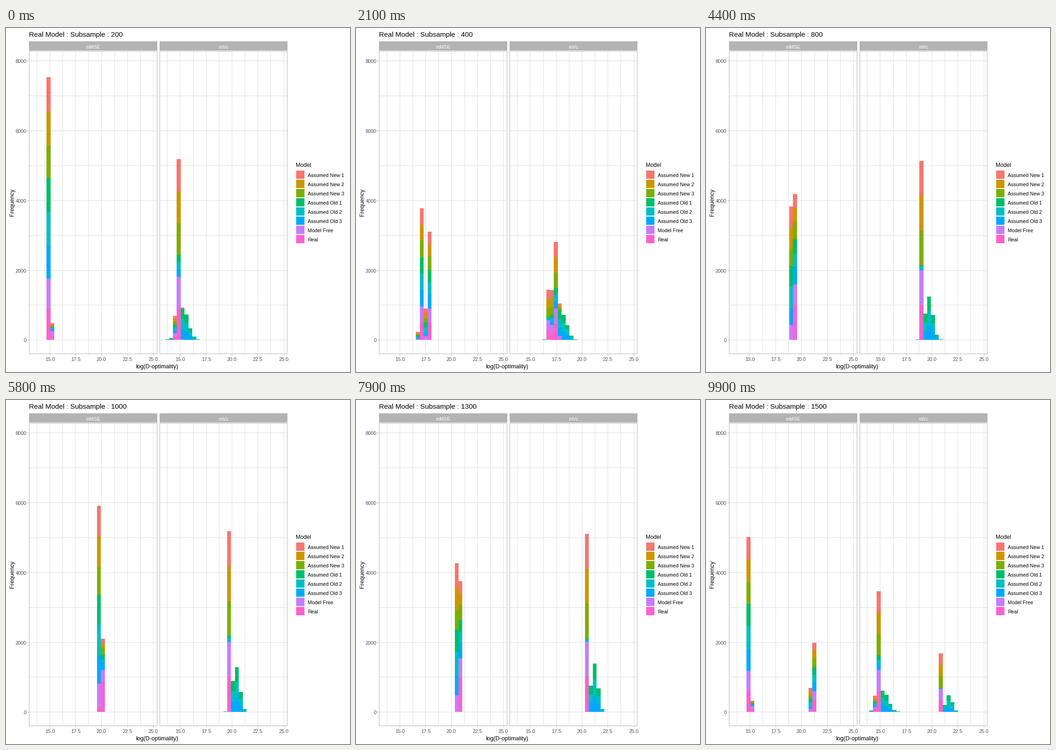
A matplotlib script for the animation above (10000 ms loop, 748 px wide and 748 px high).

```python
import math

import numpy as np
import matplotlib.pyplot as plt
from matplotlib.animation import FuncAnimation
from matplotlib.collections import PolyCollection
from matplotlib.patches import Rectangle

plt.rcParams["font.family"] = "Liberation Sans"

SIZE, DPI, FRAMES, BINS = 748, 68, 100, 30
MODELS = ["Assumed New 1", "Assumed New 2", "Assumed New 3", "Assumed Old 1",
          "Assumed Old 2", "Assumed Old 3", "Model Free", "Real"]
COLORS = ["#F8766D", "#CD9600", "#7CAE00", "#00BE67",
          "#00BFC4", "#00A9FF", "#C77CFF", "#FF61CC"]
SIZES = range(200, 1501, 100)
GREY, GRID, TICK_TEXT = "#B3B3B3", "#DEDEDE", "#4D4D4D"

PANELS = [("mMSE", 50, 329, 94.85), ("mVc", 334, 612, 378.45)]
BIN_START, BIN_W = (63.35, 346.6), 8.43
ZERO_Y, PX_PER_COUNT = 678, 0.07585
DRAWS = 1000  # simulations per model and panel


def normal_counts(mean, sd):
    """Expected histogram of DRAWS normal values; mean and sd in bins."""
    cdf = [0.5 * (1 + math.erf((k - mean) / sd / math.sqrt(2)))
           for k in range(BINS + 1)]
    return DRAWS * np.diff(cdf)


def mse_spread(model, growth):
    """Mean and sd under mMSE: every model gathers tightly."""
    if model == "Real":
        return 3.85 + 8.26 * growth, 0.12
    base = 3.63 + 8.17 * growth
    if model == "Model Free":
        return base + 0.1, 0.25
    return base + {"1": 0, "2": -0.02, "3": 0.05}[model[-1]], 0.2


def vc_spread(model, growth):
    """Mean and sd under mVc: the old models lag behind and spread out."""
    if "Old" in model:
        gap = 1.54 - 0.55 * math.exp(-3 * growth)
        return 3.63 + gap + 8.17 * growth, 1.3 * math.exp(-growth / 4)
    shift = -0.04 if model == "Real" else 0
    return 3.35 + shift + 8.13 * growth, 0.25 * math.exp(-0.4 * growth)


def histogram(n):
    growth = math.log(n / SIZES[0])
    return [np.column_stack([normal_counts(*spread(m, growth)) for m in MODELS])
            for spread in (mse_spread, vc_spread)]


COUNTS = np.array([histogram(n) for n in SIZES])
ARRIVE = [-1, 7, 15, 23] + list(range(30, FRAMES + 1, 7))
HOLD = 4


def counts_at(frame):
    """Index of the last state reached, and the blended counts."""
    i = max(j for j, a in enumerate(ARRIVE) if a <= frame)
    leave = ARRIVE[i] + HOLD
    t = max(0, (frame - leave) / (ARRIVE[i + 1] - leave))
    nxt = (i + 1) % len(SIZES)
    return i, COUNTS[i] * (1 - t) + COUNTS[nxt] * t


fig = plt.figure(figsize=(SIZE / DPI, SIZE / DPI), dpi=DPI, facecolor="white")
ax = fig.add_axes([0, 0, 1, 1])
ax.set_xlim(0, SIZE)
ax.set_ylim(SIZE, 0)
ax.axis("off")


def box(x0, y0, x1, y1, color, z=1):
    ax.add_patch(Rectangle((x0, y0), x1 - x0, y1 - y0, fc=color, ec="none",
                           lw=0, antialiased=False, zorder=z))


def label(x, y, s, px, color="black", **kw):
    return ax.text(x, y, s, fontsize=px * 72 / DPI, color=color,
                   va="baseline", zorder=6, **kw)


def grid_y(count):
    return int(ZERO_Y + 0.75 - count * PX_PER_COUNT)


def draw_panel(name, x0, x1, first_tick):
    for count in range(0, 8001, 1000):
        y = grid_y(count)
        box(x0, y, x1, y + 1, GRID)
    for k in range(-1, 9):
        x = round(first_tick + k * 28.14)
        box(x, 50, x + 1, 709, GRID)
        if k % 2 == 0:
            box(x, 709, x + 1, 712, GREY)
            label(x + 0.5, 724, f"{15 + 1.25 * k:.1f}", 10.9,
                  TICK_TEXT, ha="center")
    box(x0, 29, x1, 49, GREY)
    label((x0 + x1) / 2, 44.5, name, 10.7, "white", ha="center")
    for edge in [(x0, 50, x1, 51), (x0, 708, x1, 709),
                 (x0, 50, x0 + 1, 709), (x1 - 1, 50, x1, 709)]:
        box(*edge, GREY, z=4)


for panel in PANELS:
    draw_panel(*panel)

for count in range(0, 8001, 2000):
    y = grid_y(count)
    box(47, y, 50, y + 1, GREY)
    label(45, y + 4.7, str(count), 10.9, TICK_TEXT, ha="right")

label(328.7, 740, "log(D-optimality)", 12.6, ha="center")
label(17.5, 379.5, "Frequency", 12.6, ha="center", rotation=90,
      rotation_mode="anchor")

label(630, 302, "Model", 12.3)
for k, (name, color) in enumerate(zip(MODELS, COLORS)):
    box(631, 310 + 20 * k, 649, 328 + 20 * k, color)
    label(656, 324 + 20 * k, name, 10.9)

title = label(50, 19, "", 15.3)
bars = PolyCollection([], edgecolors="none", linewidths=0, antialiased=False,
                      zorder=3)
ax.add_collection(bars, autolim=False)


def draw(frame):
    state, counts = counts_at(frame)
    title.set_text(f"Real Model : Subsample : {SIZES[state]}")
    verts, colors = [], []
    for start, panel in zip(BIN_START, counts):
        for k in range(BINS):
            x0, x1 = int(start + k * BIN_W), int(start + (k + 1) * BIN_W)
            bottom, total = ZERO_Y, 0
            for m in reversed(range(len(MODELS))):
                total += panel[k, m]
                top = round(ZERO_Y - total * PX_PER_COUNT)
                if top < bottom:
                    verts.append([(x0, bottom), (x1, bottom),
                                  (x1, top), (x0, top)])
                    colors.append(COLORS[m])
                bottom = top
    bars.set_verts(verts)
    bars.set_facecolor(colors)
    return bars, title


anim = FuncAnimation(fig, draw, frames=FRAMES, interval=100, repeat=True,
                     repeat_delay=0, blit=False)
plt.show()
```
